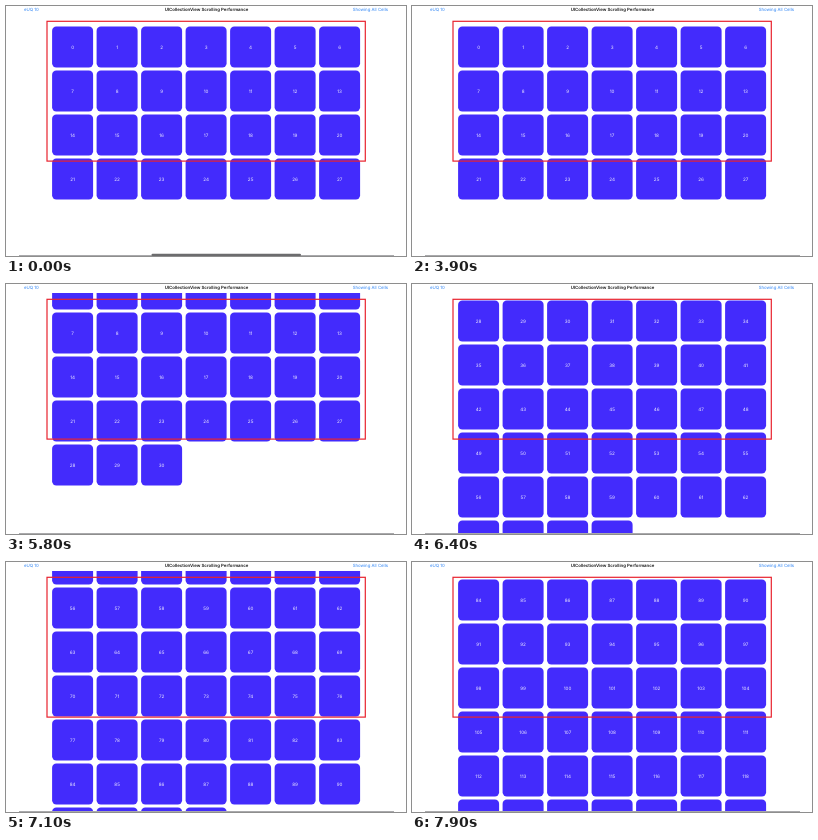
An HTML page that plays this animation: 400 px wide and 250 px high, repeating every 8 s.

```html
<!DOCTYPE html>
<html lang="en">
<head>
<meta charset="utf-8">
<title>Scrolling grid</title>
<style>
  html, body { margin: 0; width: 100%; height: 100%; overflow: hidden; background: #fff; }
  svg { display: block; width: 100vw; height: 100vh; }
  text { font-family: Inter, "Liberation Sans", sans-serif; font-size: 4.35px; text-rendering: geometricPrecision; }
  .link { fill: #2a82f4; }
  .title { font-weight: 600; fill: #111; text-anchor: middle; }
  .cell rect { fill: #432bfc; }
  .cell text { fill: #f1efff; font-size: 4.6px; text-anchor: middle; }
</style>
</head>
<body>
<svg viewBox="0 0 400 250">
  <rect width="400" height="250" fill="#fff"/>
  <g id="grid"></g>
  <rect width="400" height="9" fill="#fff"/>
  <text class="link" x="18" y="4.8">eUQ 10</text>
  <text class="title" x="200.5" y="4.8">UICollectionView Scrolling Performance</text>
  <text class="link" x="382" y="4.8" text-anchor="end">Showing All Cells</text>
  <rect x="41" y="15.3" width="318.3" height="139.8" fill="none" stroke="#e8222e" stroke-width="1.2"/>
  <rect x="13" y="249" width="375" height="1" fill="#a9a9ab"/>
  <rect id="indicator" x="145.5" y="247.8" width="149.5" height="2.2" rx="1.1" fill="#6c6c6e"/>
</svg>
<script>
const LOOP = 8000, STEP = 100;
const COLS = 7, CELL = 41, PITCH_X = 44.5, PITCH_Y = 44;
const LEFT = 46.1, TOP = 20.5, VIEW_TOP = 15, STAGE_H = 250;
const START = 5500, CRUISE = 5800;

// [time, value] pairs
const SCROLL = [[CRUISE, 36], [6400, 180], [7100, 347], [7900, 531]];
const LOADED = [[START, 28], [CRUISE, 31], [6400, 67], [7100, 95], [7900, 126]];

const grid = document.getElementById("grid");
const indicator = document.getElementById("indicator");

function make(name, attrs, parent) {
  const node = document.createElementNS("http://www.w3.org/2000/svg", name);
  for (const key in attrs) node.setAttribute(key, attrs[key]);
  return parent.appendChild(node);
}

function sample(keys, t) {
  if (t <= keys[0][0]) return keys[0][1];
  for (let i = 1; i < keys.length; i++) {
    const [t0, a] = keys[i - 1], [t1, b] = keys[i];
    if (t <= t1) return a + (b - a) * (t - t0) / (t1 - t0);
  }
  return keys[keys.length - 1][1];
}

function scrollAt(t) {
  if (t < START) return 0;
  if (t < CRUISE) return 36 * ((t - START) / (CRUISE - START)) ** 2;
  return sample(SCROLL, t);
}

const cells = Array.from({ length: 126 }, (_, i) => {
  const x = LEFT + (i % COLS) * PITCH_X;
  const y = TOP + Math.floor(i / COLS) * PITCH_Y;
  const node = make("g", { class: "cell" }, grid);
  make("rect", { x, y, width: CELL, height: CELL, rx: 4.2 }, node);
  make("text", { x: x + CELL / 2, y: y + CELL / 2 + 1.7 }, node).textContent = i;
  return { node, y };
});

function draw(t) {
  const offset = scrollAt(t);
  const loaded = Math.round(sample(LOADED, t));
  grid.setAttribute("transform", `translate(0 ${-offset})`);
  cells.forEach(({ node, y }, i) => {
    const top = y - offset;
    // rows leave as soon as they clear the red viewport
    const shown = i < loaded && top + CELL > VIEW_TOP && top < STAGE_H;
    node.style.display = shown ? "" : "none";
  });
  indicator.setAttribute("opacity", Math.min(1, Math.max(0, (1200 - t) / 400)));
}

const origin = performance.now();
function tick() {
  const t = Math.max(0, performance.now() - origin) % LOOP;
  draw(Math.floor(t / STEP) * STEP);
  requestAnimationFrame(tick);
}
tick();
</script>
</body>
</html>
```
